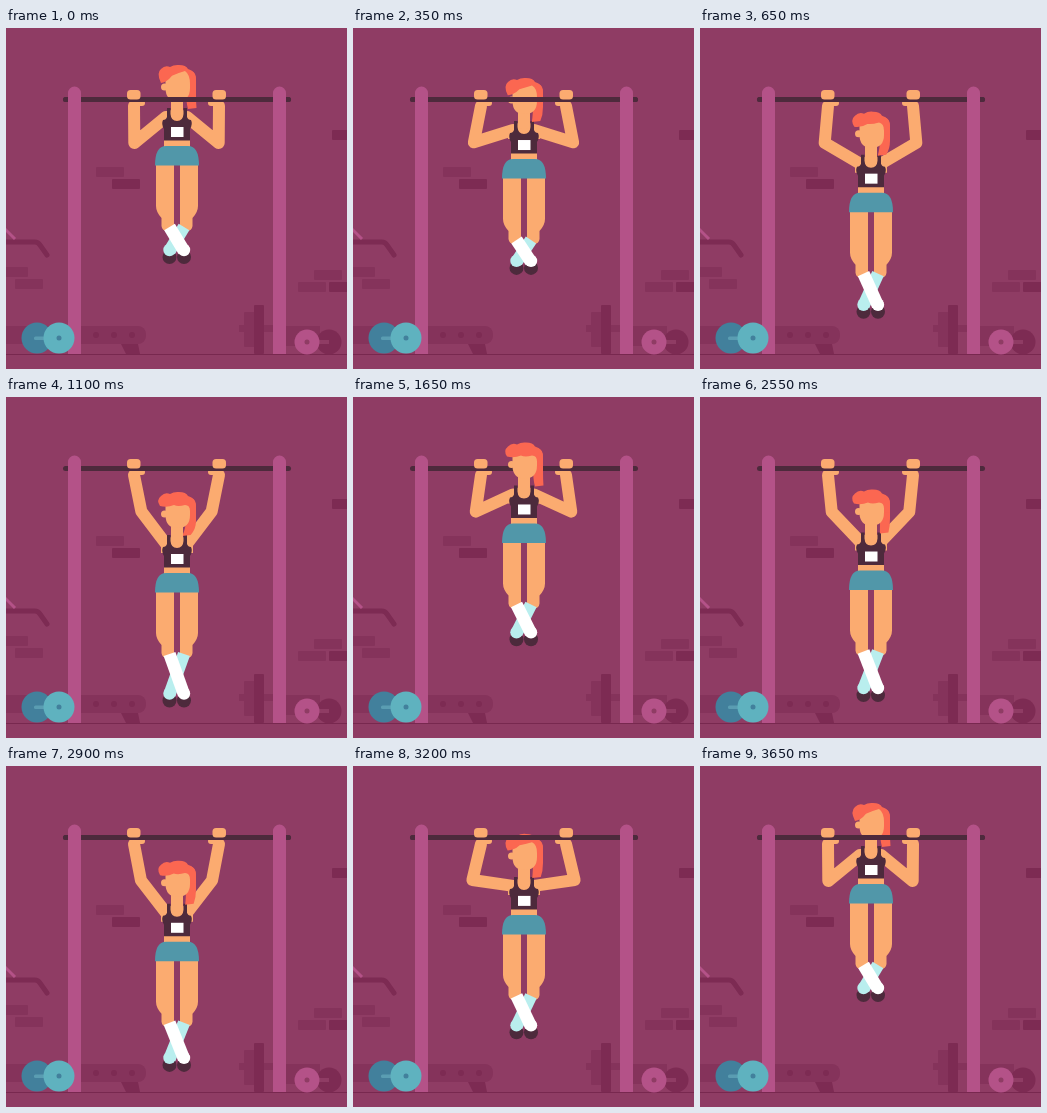
These frames come from a looping animation (341 px wide and 341 px high, 3700 ms). An HTML page:

```html
<!DOCTYPE html>
<html lang="en">
<head>
<meta charset="utf-8">
<title>Pull-ups</title>
<style>
html, body { margin: 0; width: 100%; height: 100%; overflow: hidden; background: #8f3c64; }
svg { display: block; width: 100vw; height: 100vh; }
.dark { fill: #7d2b53; }
.dim { fill: #85335b; }
.pink { fill: #b45288; }
.skin { fill: #fbab70; }
.hair { fill: #fb6751; }
.ink { fill: #4d2a3c; }
.arm { fill: none; stroke: #fbab70; stroke-width: 12; stroke-linejoin: round; stroke-linecap: round; }
</style>
</head>
<body>
<svg viewBox="0 0 341 341" xmlns="http://www.w3.org/2000/svg">
  <rect width="341" height="341" fill="#8f3c64"/>

  <!-- wall -->
  <g class="dim">
    <rect x="90" y="139" width="28" height="10" rx="1"/>
    <rect x="-5" y="239" width="27" height="10" rx="1"/>
    <rect x="9" y="251" width="28" height="10" rx="1"/>
    <rect x="308" y="242" width="28" height="10" rx="1"/>
    <rect x="292" y="254" width="28" height="10" rx="1"/>
  </g>
  <g class="dark">
    <rect x="106" y="151" width="28" height="10" rx="1"/>
    <rect x="326" y="102" width="20" height="10" rx="1"/>
    <rect x="323" y="254" width="20" height="10" rx="1"/>
  </g>

  <!-- gym equipment -->
  <path d="M-2 214H29Q32 214 34 217L41 227" fill="none" stroke="#7d2b53" stroke-width="5" stroke-linecap="round"/>
  <path d="M-2 200L9 211" stroke="#b45288" stroke-width="3"/>
  <rect class="dim" x="-10" y="298" width="150" height="18" rx="8"/>
  <path class="dark" d="M115 316H132L134 326H120Z"/>
  <g class="dark">
    <circle cx="90" cy="307" r="3"/><circle cx="108" cy="307" r="3"/><circle cx="126" cy="307" r="3"/>
  </g>
  <rect class="dim" x="233" y="297" width="36" height="7"/>
  <rect class="dim" x="280" y="298" width="34" height="20"/>
  <rect class="dim" x="238" y="284" width="11" height="35" rx="1"/>
  <rect class="dark" x="248" y="277" width="10" height="49" rx="1"/>
  <path d="M0 326.5H341" stroke="#78284f"/>

  <circle class="dark" cx="323" cy="314" r="12.5"/>
  <rect x="301" y="312" width="22" height="4" fill="#8f3c64"/>
  <circle class="pink" cx="301" cy="314" r="12.5"/>
  <circle cx="301" cy="314" r="2.5" fill="#8f3c64"/>

  <g id="legs">
    <g id="cyan"></g>
    <g id="white"></g>
  </g>

  <path id="armL" class="arm"/>
  <path id="armR" class="arm"/>
  <path d="M129 75H136" class="arm" style="stroke-width:6"/>
  <path d="M212 75H205" class="arm" style="stroke-width:6"/>

  <g id="body">
    <path class="skin" d="M150 134H168V198Q167 203 161.500 203Q156 203 155.500 198V190Q150 184 150 178Z"/>
    <path class="skin" d="M192 134H174V198Q175 203 180.500 203Q186 203 186.500 198V190Q192 184 192 178Z"/>
    <g id="socks"></g>
    <rect class="skin" x="158" y="106" width="26" height="15"/>
    <path d="M149 137.500Q149 118 160 118H182Q193 118 193 137.500Z" fill="#5197a9"/>
    <path class="skin" d="M165 82H177L187 88V98H155V88Z"/>
    <path class="ink" d="M161 80H164.500V86Q165 93 171 93Q177 93 177.500 86V80H181V89Q182 92 185 92Q187 96 184 101V112.500H158V101Q155 96 157 92Q160 92 161 89Z"/>
    <rect x="165" y="99" width="12.500" height="10" fill="#fff"/>
  </g>

  <rect class="ink" x="57" y="69" width="228" height="5" rx="2.500"/>
  <g id="head">
    <path id="tail" class="hair"/>
    <rect class="skin" x="165" y="62" width="12" height="26" rx="5"/>
    <circle class="skin" cx="158.500" cy="59" r="3.500"/>
    <path class="skin" d="M159.500 46Q160 40 171 40Q184 40 184 48V60Q184 73 171.500 73Q159.500 73 159.500 60Z"/>
    <path id="cap" class="hair"/>
  </g>
  <rect id="bar" class="ink" x="57" y="69" width="228" height="5" rx="2.500"/>

  <path class="pink" d="M62 326V65a6.500 6.500 0 0 1 13 0V326ZM267 326V65a6.500 6.500 0 0 1 13 0V326Z"/>
  <rect class="skin" x="121" y="62" width="13.500" height="9.500" rx="3.500"/>
  <rect class="skin" x="206.500" y="62" width="13.500" height="9.500" rx="3.500"/>

  <circle cx="31" cy="310" r="15.500" fill="#42809c"/>
  <rect x="28" y="308.500" width="14" height="3.500" rx="1.500" fill="#5a9db2"/>
  <circle cx="53" cy="310" r="15.500" fill="#5fb2bf"/>
  <circle cx="53" cy="310" r="2.500" fill="#42809c"/>
</svg>
<script>
const LOOP = 3700;
const MID = 170.5;
const el = id => document.getElementById(id);
const set = (id, name, value) => el(id).setAttribute(name, value);

// [time, value] pairs
const DROP = [[0, 0], [100, 0], [935, 63], [1825, 3], [2750, 62], [3650, 0], [LOOP, 0]];
const SHIN = [[0, 0], [250, -3], [1000, 17], [1850, 3], [2650, 14], [LOOP, 0]];
const NOD = [[0, 1], [300, .8], [900, 0], [2750, 0], [3500, 1], [LOOP, 1]];
const SWAY = [[0, 1], [500, -3], [1050, -5], [1600, 1], [2400, -1], [3100, -2], [3650, 1], [LOOP, 1]];

function ease(keys, t) {
  const i = keys.findIndex(k => k[0] > t);
  const [t0, a] = keys[i - 1], [t1, b] = keys[i];
  return a + (b - a) * (1 - Math.cos(Math.PI * (t - t0) / (t1 - t0))) / 2;
}

// two-bone arm from the grip to the shoulder
function arm(drop) {
  const hx = 128, hy = 78, sx = 160, sy = 89 + drop, fore = 37, upper = 41;
  const d = Math.hypot(sx - hx, sy - hy);
  const ux = (sx - hx) / d, uy = (sy - hy) / d;
  const along = (fore * fore - upper * upper + d * d) / (2 * d);
  const out = Math.sqrt(Math.max(0, fore * fore - along * along));
  return [[hx, hy], [hx + ux * along - uy * out, hy + uy * along + ux * out], [sx, sy]];
}

const line = pts => 'M' + pts.map(p => p.map(n => n.toFixed(2)).join(' ')).join('L');
const mirror = pts => pts.map(([x, y]) => [2 * MID - x, y]);

function shin(x0, x1, extra, color) {
  const y = 223 + extra;
  return `<circle class="ink" cx="${x1}" cy="${y + 6}" r="7"/>` +
    `<path d="M${x0} 199L${x1} ${y}" stroke="${color}" stroke-width="12.5"/>` +
    `<circle cx="${x1}" cy="${y - 1}" r="6.2" fill="${color}"/>`;
}

function draw(t) {
  const drop = ease(DROP, t), extra = ease(SHIN, t);
  const nod = ease(NOD, t), sway = ease(SWAY, t);
  const shift = `translate(0 ${drop.toFixed(2)})`;
  set('body', 'transform', shift);
  set('head', 'transform', shift);

  const pts = arm(drop);
  set('armL', 'd', line(pts));
  set('armR', 'd', line(mirror(pts)));

  el('socks').innerHTML = shin(178, 163.5, extra, '#b9eeee') + shin(163.5, 178, extra, '#fff');

  set('tail', 'd', `M178 43H186Q190 45 190 51V66Q190 74 ${189.5 + sway} 80L${181 + sway} 81Q180 74 180 62Z`);
  const lift = 7 * nod;
  set('cap', 'd', `M${154 + nod} ${51 + 4 * nod}Q150 45 155 41Q159 37 164 39Q168 36.500 173 37Q180 37 182 41` +
    `Q190 43 190 53V60H184V56Q184 ${50 - lift / 2} 179 ${50 - lift}` +
    `Q172 ${52 - lift} ${168 - 2 * nod} ${50 - lift / 3}Q161 ${53 + nod} ${154 + nod} ${51 + 4 * nod}Z`);

  // the face passes before the bar on one pull, behind it on the other
  set('bar', 'visibility', t > 935 && t < 2750 ? 'hidden' : 'visible');
}

function tick() {
  draw(performance.now() % LOOP);
  requestAnimationFrame(tick);
}
tick();
</script>
</body>
</html>
```
